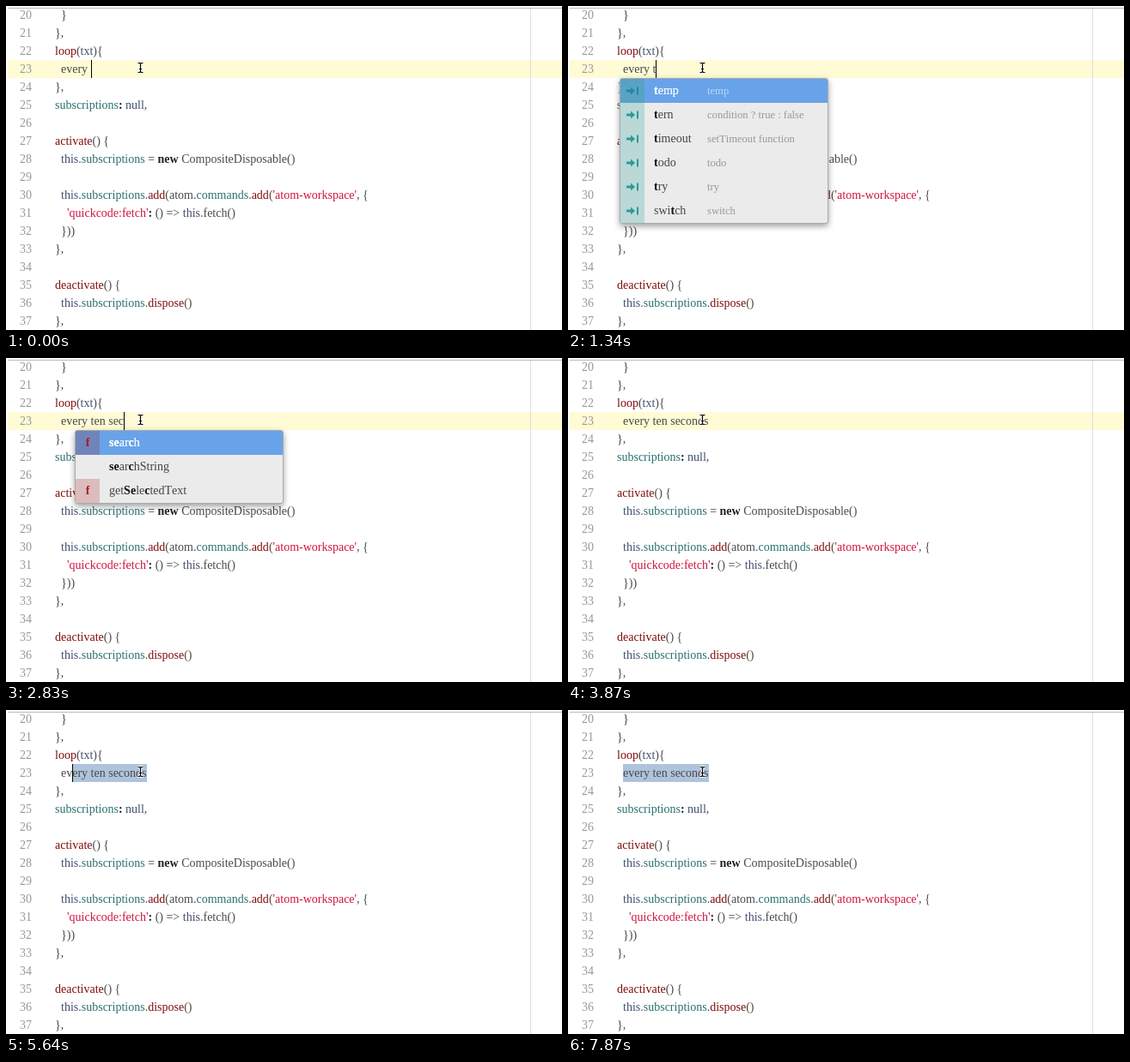
Animation, 647 px wide and 378 px high, one loop 8 s. Source, as an HTML page:

```html
<!DOCTYPE html>
<html lang="en">
<head>
<meta charset="utf-8">
<title>Editor typing</title>
<style>
html, body { margin: 0; width: 100%; height: 100%; overflow: hidden; background: #fff; }
body {
  position: relative;
  font: 14px/21px "Liberation Serif", Times, serif;
  font-kerning: none;
  font-variant-ligatures: none;
  color: #4a4a4a;
  cursor: default;
}
body > * { position: absolute; }
i { font-style: normal; }
pre { margin: 0; font: inherit; white-space: pre; }
#numbers { left: 0; top: 0; width: 30px; text-align: right; color: #999; }
#code { left: 57px; top: 0; }
#topline { left: 2px; right: 0; top: 2px; height: 1px; background: #bcb8b8; }
#guide { left: 610px; top: 3px; bottom: 0; width: 1px; background: #dedede; }
#active { left: 2px; right: 0; top: 63px; height: 21px; background: #fffbd5; }
.fn { color: #800c0c; }
.prop { color: #2c6f6f; }
.str { color: #d0143f; }
.val { color: #445070; }
#code b { color: #222; }
#line { left: 64px; top: 63px; height: 21px; white-space: pre; }
#line span { display: inline-block; height: 21px; vertical-align: top; }
#picked { background: #afc3dd; }
#caret { display: inline-block; vertical-align: top; width: 1px; height: 21px; margin-right: -1px; background: #000; position: relative; }
#pointer { left: 151px; top: 64px; }
#menu {
  top: 84px; width: 241px;
  border: 1px solid #aaa; border-radius: 3px; overflow: hidden;
  background: #ebebeb; box-shadow: 0 3px 7px rgba(0, 0, 0, .38);
  line-height: 28px; color: #444;
}
.row { position: relative; height: 28px; white-space: pre; }
.row > * { position: absolute; top: 0; height: 28px; }
.row b { color: #111; }
.icon { left: 0; width: 28px; text-align: center; }
.snippet .icon { background: #b9d8d6; color: #2b9a98; }
.function .icon { background: #dcbcbc; color: #a81c1c; font-weight: bold; }
.name { left: 39px; }
.note { left: 101px; font-size: 12.6px; color: #989898; }
.row:first-child { background: #68a3e9; color: #e9f2fd; }
.row:first-child .name { color: #f0f6fe; text-shadow: 0 0 .6px #fff; }
.row:first-child b { color: #fff; }
.row:first-child .note { color: #b9d6f6; }
.snippet:first-child .icon { background: #58a2c6; color: #218a9a; }
.function:first-child .icon { background: #7184ba; }
.icon svg { display: block; }
</style>
</head>
<body>
<div id="active"></div>
<div id="guide"></div>
<pre id="numbers"></pre>
<pre id="code">  }
},
<i class="fn">loop</i>(<i class="val">txt</i>){

},
<i class="prop">subscriptions</i><b>:</b> <i class="val">null</i>,

<i class="fn">activate</i>() {
  <i class="val">this</i>.<i class="prop">subscriptions</i> = <b>new</b> CompositeDisposable()

  <i class="val">this</i>.<i class="prop">subscriptions</i>.<i class="fn">add</i>(atom.<i class="prop">commands</i>.<i class="fn">add</i>(<i class="str">'atom-workspace'</i>, {
    <i class="str">'quickcode:fetch'</i><b>:</b> () =&gt; <i class="val">this</i>.fetch()
  }))
},

<i class="fn">deactivate</i>() {
  <i class="val">this</i>.<i class="prop">subscriptions</i>.<i class="fn">dispose</i>()
},</pre>
<div id="line"><span id="before"></span><i id="caret"></i><span id="picked"></span></div>
<div id="topline"></div>
<div id="menu"></div>
<svg id="pointer" width="12" height="16" fill="none">
  <path id="beam" d="M2.5 2.5H4.5L5.5 3.5L6.5 2.5H8.5M2.5 13.5H4.5L5.5 12.5L6.5 13.5H8.5M5.5 3V13M4 9.5H7" stroke="#fff" stroke-width="2.6"/>
  <use href="#beam"/>
  <path d="M2.5 2.5H4.5L5.5 3.5L6.5 2.5H8.5M2.5 13.5H4.5L5.5 12.5L6.5 13.5H8.5M5.5 3V13M4 9.5H7" stroke="#000" stroke-width="1.2"/>
</svg>
<script>
const LOOP = 8000;
const $ = id => document.getElementById(id);
const FULL = 'every ten seconds';

const snippets = [
  ['temp', 'temp'],
  ['tern', 'condition ? true : false'],
  ['timeout', 'setTimeout function'],
  ['todo', 'todo'],
  ['try', 'try'],
  ['switch', 'switch']
].map(([name, note]) => ({ name, note, kind: 'snippet' }));

const symbols = [
  { name: 'search', kind: 'function' },
  { name: 'searchString', kind: 'plain' },
  { name: 'getSelectedText', kind: 'function' }
];

const icons = {
  snippet: '<svg width="28" height="28" fill="currentColor"><path d="M7 12.5h5V9.500l5 4.500-5 4.500v-3H7zM19 9.500h2v9h-2z"/></svg>',
  function: 'f',
  plain: ''
};

// Each step: time, characters typed, caret visible, characters selected from the end
const steps = [
  [0, 6, 1], [300, 6, 0], [600, 8, 1], [900, 9, 1], [1050, 8, 1], [1190, 6, 1],
  [1340, 7, 1], [1490, 8, 1], [1790, 8, 0], [2080, 10, 1],
  [2380, 11, 1], [2530, 12, 1], [2830, 13, 1], [2980, 14, 1],
  [3280, 15, 1], [3430, 16, 1], [3580, 17, 1], [3870, 17, 0]
];
const selection = [
  [4020, 1], [4320, 2], [4470, 3], [4620, 5], [4760, 7], [4910, 9], [5060, 11],
  [5200, 12], [5350, 13], [5500, 14], [5640, 15], [5790, 16], [6090, 17]
];
for (const [time, count] of selection) steps.push([time, 17, 1, count]);
[6390, 6680, 7130, 7580, 7870].forEach((time, i) => steps.push([time, 17, i % 2, 17]));

// Subsequence match; returns the name with matched letters in bold, or null
function highlight(name, query) {
  let found = 0;
  const html = [...name].map(ch =>
    ch.toLowerCase() === query[found] ? (found++, `<b>${ch}</b>`) : ch).join('');
  return found === query.length ? html : null;
}

const ruler = document.createElement('canvas').getContext('2d');
ruler.font = '14px "Liberation Serif", Times, serif';
ruler.fontKerning = 'none';

function showMenu(text) {
  const word = text.split(' ').pop();
  const pool = word.length > 2 ? [...symbols, ...snippets] : snippets;
  const rows = word ? pool.map(item => ({ ...item, html: highlight(item.name, word) }))
    .filter(item => item.html) : [];
  const head = text.slice(0, text.length - word.length);
  $('menu').style.display = rows.length ? 'block' : 'none';
  $('menu').style.left = Math.round(25 + ruler.measureText(head).width) + 'px';
  $('menu').innerHTML = rows.map(({ kind, html, note = '' }) =>
    `<div class="row ${kind}"><span class="icon">${icons[kind]}</span>` +
    `<span class="name">${html}</span><span class="note">${note}</span></div>`).join('');
}

function render([, typed, caretOn, picked = 0]) {
  const text = FULL.slice(0, typed);
  $('before').textContent = text.slice(0, typed - picked);
  $('picked').textContent = text.slice(typed - picked);
  $('caret').style.visibility = caretOn ? 'visible' : 'hidden';
  $('active').style.display = picked ? 'none' : 'block';
  showMenu(text);
}

$('numbers').textContent = Array.from({ length: 18 }, (_, i) => 20 + i).join('\n');

const start = performance.now();
let current;
function tick() {
  const time = (performance.now() - start) % LOOP;
  const step = steps.findLast(([at]) => at <= time);
  if (step !== current) render(current = step);
  requestAnimationFrame(tick);
}
tick();
</script>
</body>
</html>
```
